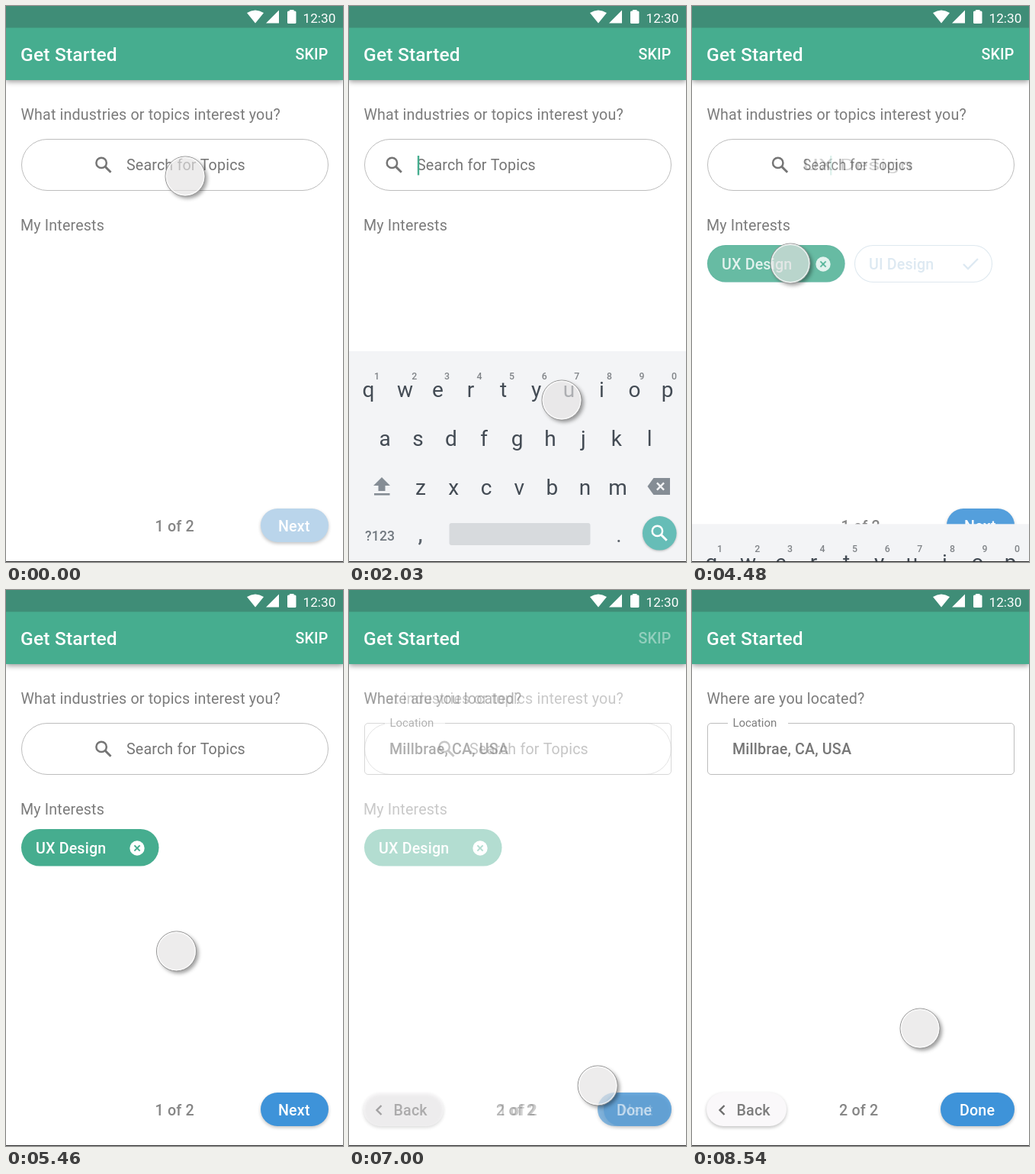
An HTML page with a canvas for the animation above (8610 ms loop, 442 by 728 pixels).

```html
<!DOCTYPE html>
<html lang="en">
<head>
<meta charset="utf-8">
<title>Get Started</title>
<style>
  html, body { margin: 0; width: 100%; height: 100%; overflow: hidden; background: #fff; }
  canvas { display: block; width: 442px; height: 728px; }
</style>
</head>
<body>
<canvas id="stage"></canvas>
<script>
const W = 442, H = 728, LOOP = 8610, STEP = 70;
const GREEN = '#46ad8f', GRAY = '#7c7c7c';
const canvas = document.getElementById('stage');
const ctx = canvas.getContext('2d');
const ratio = window.devicePixelRatio || 1;
canvas.width = W * ratio;
canvas.height = H * ratio;

const mix = (a, b, p) => a + (b - a) * p;
const clamp = p => Math.max(0, Math.min(1, p));
const ease = p => p < 0.5 ? 2 * p * p : 1 - 2 * (1 - p) * (1 - p);
const tween = (t, start, length) => ease(clamp((t - start) / length));

// time, x, y
const pointerPath = [
  [0, 235, 223], [300, 234, 215], [950, 234, 215], [1900, 279, 516],
  [3290, 279, 516], [4000, 129, 337], [4800, 129, 337], [6300, 373, 688],
  [6700, 373, 688], [7650, 138, 492], [7750, 138, 492], [8540, 299, 574]
];

function pointerAt(t) {
  for (let i = 1; i < pointerPath.length; i++) {
    const [t0, x0, y0] = pointerPath[i - 1], [t1, x1, y1] = pointerPath[i];
    if (t <= t1) {
      const p = tween(t, t0, t1 - t0);
      return [mix(x0, x1, p), mix(y0, y1, p)];
    }
  }
  return pointerPath[pointerPath.length - 1].slice(1);
}

function fade(alpha, draw) {
  if (alpha <= 0) return;
  ctx.save();
  ctx.globalAlpha *= alpha;
  draw();
  ctx.restore();
}

function setFont(size, weight) {
  ctx.font = `${weight} ${size}px Roboto, sans-serif`;
  ctx.letterSpacing = size > 16 && size < 26 && size !== 17.2 ? '0.18px' : '0px';
}

function text(str, x, y, color, size = 19.64, weight = 400, align = 'left') {
  setFont(size, weight);
  ctx.textAlign = align;
  ctx.fillStyle = color;
  ctx.fillText(str, x, y);
}

function box(x, y, w, h, r) {
  ctx.beginPath();
  ctx.roundRect(x, y, w, h, r);
}

function fill(color) { ctx.fillStyle = color; ctx.fill(); }

function stroke(color, width = 1) {
  ctx.strokeStyle = color;
  ctx.lineWidth = width;
  ctx.stroke();
}

function line(points, color, width) {
  ctx.beginPath();
  points.forEach(([x, y]) => ctx.lineTo(x, y));
  stroke(color, width);
}

function polygon(points, color) {
  ctx.beginPath();
  points.forEach(([x, y]) => ctx.lineTo(x, y));
  ctx.closePath();
  fill(color);
}

function cross(x, y, r, color, width) {
  line([[x - r, y - r], [x + r, y + r]], color, width);
  line([[x + r, y - r], [x - r, y + r]], color, width);
}

function shadowed(color, blur, dx, dy, draw) {
  ctx.save();
  ctx.shadowColor = color;
  ctx.shadowBlur = blur * ratio;
  ctx.shadowOffsetX = dx * ratio;
  ctx.shadowOffsetY = dy * ratio;
  draw();
  ctx.restore();
}

function magnifier(x, y, color) {
  ctx.beginPath();
  ctx.arc(x - 2.6, y - 2.6, 6.7, 0, 7);
  stroke(color, 2.5);
  line([[x + 2.4, y + 2.4], [x + 9.8, y + 9.8]], color, 2.9);
}

function pillButton(x, w, label, labelX, color, labelColor) {
  shadowed('rgba(0,0,0,.24)', 4, 0, 2, () => {
    box(x, 658, w, 44, 22);
    fill(color);
  });
  text(label, labelX, 688, labelColor, 19.64, 500);
}

function header(skipAlpha) {
  shadowed('rgba(0,0,0,.42)', 7, 0, 2, () => {
    ctx.fillStyle = GREEN;
    ctx.fillRect(0, 28, W, 69);
  });
  ctx.fillStyle = '#3f8d77';
  ctx.fillRect(0, 0, W, 28.5);

  ctx.beginPath();
  ctx.moveTo(327, 22.5);
  ctx.lineTo(316, 9);
  ctx.quadraticCurveTo(327, 2, 338, 9);
  ctx.closePath();
  fill('#fff');
  polygon([[341, 22.5], [358, 22.5], [358, 5.5]], '#fff');
  box(369, 6.5, 11.5, 16.5, 1.5);
  fill('#fff');
  ctx.fillRect(372, 5, 5.5, 3);
  text('12:30', 389.5, 22, '#fff', 17.2);

  text('Get Started', 19, 71.5, '#fff', 24.56, 500);
  fade(skipAlpha, () => text('SKIP', 379.5, 70.3, '#fff', 19.64, 500));
}

function searchField(s) {
  box(20.5, 174.5, 402, 67, 33.5);
  stroke('#bdbdbd');
  magnifier(mix(127.7, 59, s.open), 208, '#757575');

  const hint = 'Search for Topics', query = 'UX Design';
  const typed = s.typed - s.chosen;
  setFont(19.64, 400);
  const hintW = ctx.measureText(hint).width, queryW = ctx.measureText(query).width;
  const width = mix(hintW, queryW, typed);
  const x = mix(158, 89, s.open);

  // both strings share one box whose width morphs between them
  const morph = (str, own, color, alpha) => fade(alpha, () => {
    ctx.translate(x, 0);
    ctx.scale(width / own, 1);
    text(str, 0, 215.3, color);
  });
  morph(hint, hintW, '#757575', 1 - typed);
  morph(query, queryW, '#000', typed);

  fade(s.open, () => {
    ctx.fillStyle = GREEN;
    ctx.fillRect(mix(89.8, 181, s.typed), 196, 2.4, 25.5);
  });
}

function chip(x, label) {
  box(x + .5, 313.5, 180, 48, 24);
  stroke('#4a7fa6', 1.1);
  text(label, x + 19, 345, '#4486b8', 19.64, 500);
  line([[x + 143, 338], [x + 149, 344], [x + 162, 331]], '#4486b8', 2.3);
}

function chosenChip() {
  box(20, 313, 180.5, 48.5, 24.2);
  fill(GREEN);
  text('UX Design', 39, 345, '#fff', 19.64, 500);
  ctx.beginPath();
  ctx.arc(172, 338, 9.7, 0, 7);
  fill('#fff');
  cross(172, 338, 3.6, GREEN, 2);
}

function topicsPage(s) {
  text('What industries or topics interest you?', 19.5, 149, GRAY);
  searchField(s);
  text('My Interests', 19, 294, GRAY);

  fade(s.typed - s.chosen, () => {
    chip(20, 'UX Design');
    chip(213, 'UI Design');
  });
  fade(s.chosen, chosenChip);

  text('1 of 2', 195.5, 688, '#868686', 19.64, 500);
  const blue = [[186, 62], [213, 147], [235, 217]].map(([a, b]) => Math.round(mix(a, b, s.chosen)));
  pillButton(334, 89, 'Next', 357, `rgb(${blue})`, '#fff');
}

function keyRow(keys, x, step, y) {
  [...keys].forEach((k, i) => text(k, x + i * step, y, '#434b54', 28, 400, 'center'));
}

function keyboard(open) {
  if (open <= 0) return;
  ctx.save();
  ctx.translate(0, 276 * (1 - open));
  ctx.fillStyle = '#f3f4f6';
  ctx.fillRect(0, 452, W, 276);

  [...'1234567890'].forEach((n, i) =>
    text(n, (i ? 43.2 : 36.5) + i * 42.6, 489, '#808488', 12.3, 500, 'center'));
  text('q', 25.5, 512, '#434b54', 28, 400, 'center');
  keyRow('wertyuiop', 73.5, 43, 512);
  keyRow('asdfghjkl', 47, 43.4, 575.5);
  keyRow('zxcvbnm', 94, 43.1, 639.5);

  const dim = '#858d95';
  polygon([[43, 617], [54, 628], [47.5, 628], [47.5, 635], [38.5, 635], [38.5, 628], [32, 628]], dim);
  ctx.fillRect(33, 638, 20.5, 2.6);
  polygon([[391.5, 629], [399.5, 618], [421, 618], [421, 640], [399.5, 640]], dim);
  cross(408.5, 629, 4.6, '#f3f4f6', 2.4);

  text('?123', 21, 700, '#727980', 17.6, 500);
  text(',', 93.5, 701, '#5c646c', 28, 500, 'center');
  text('.', 354, 702, '#5c646c', 28, 400, 'center');
  box(131.5, 677, 185, 29, 3);
  fill('#d7dadd');
  shadowed('rgba(0,0,0,.25)', 3, 0, 1, () => {
    ctx.beginPath();
    ctx.arc(407.3, 690.3, 22.3, 0, 7);
    fill('#66bdb7');
  });
  magnifier(407, 690, '#fff');
  ctx.restore();
}

function locationPage() {
  ctx.fillStyle = '#fff';
  ctx.fillRect(0, 97, W, H - 97);
  text('Where are you located?', 19.5, 149, GRAY);
  box(20.5, 174.5, 402, 67, 4.5);
  stroke('#bdbdbd');
  ctx.fillStyle = '#fff';
  ctx.fillRect(47, 172, 79, 5);
  text('Location', 53.5, 178.5, '#7d7d7d', 14.9);
  text('Millbrae, CA, USA', 53, 215.3, '#777', 19.64, 500);

  pillButton(19, 105, 'Back', 58.5, '#faf8fa', '#7d7d7d');
  line([[42.5, 675], [36.5, 681], [42.5, 687]], '#6d6d6d', 2.4);
  text('2 of 2', 193, 688, '#868686', 19.64, 500);
  pillButton(326, 97, 'Done', 351, '#3e93d9', '#fff');
}

function pointer(x, y) {
  // the shadow falls only outside the translucent disc
  ctx.save();
  ctx.beginPath();
  ctx.rect(0, 0, W, H);
  ctx.arc(x, y, 26, 0, 7);
  ctx.clip('evenodd');
  shadowed('rgba(0,0,0,.38)', 5, 3, 3, () => {
    ctx.beginPath();
    ctx.arc(x, y, 26, 0, 7);
    fill('#999');
  });
  ctx.restore();

  ctx.beginPath();
  ctx.arc(x, y, 26, 0, 7);
  fill('rgba(228,226,227,.66)');
  stroke('rgba(135,135,135,.85)', 1);
  ctx.beginPath();
  ctx.arc(x, y, 24.7, 0, 7);
  stroke('rgba(255,255,255,.7)', 1.4);
}

function render(t) {
  const chosen = tween(t, 4130, 500);
  const state = {
    open: tween(t, 350, 500) - chosen,
    typed: tween(t, 2150, 500),
    chosen
  };
  const next = tween(t, 6700, 550);

  ctx.setTransform(ratio, 0, 0, ratio, 0, 0);
  ctx.fillStyle = '#fff';
  ctx.fillRect(0, 0, W, H);
  if (next < 1) topicsPage(state);
  keyboard(state.open);
  fade(next, locationPage);
  header(1 - next);
  ctx.fillStyle = '#2b2b2b';
  ctx.fillRect(0, 727, W, 1);
  pointer(...pointerAt(t));
}

const begin = performance.now();
function tick() {
  const t = (performance.now() - begin) % LOOP;
  render(Math.floor(t / STEP) * STEP);
  requestAnimationFrame(tick);
}
tick();
</script>
</body>
</html>
```
